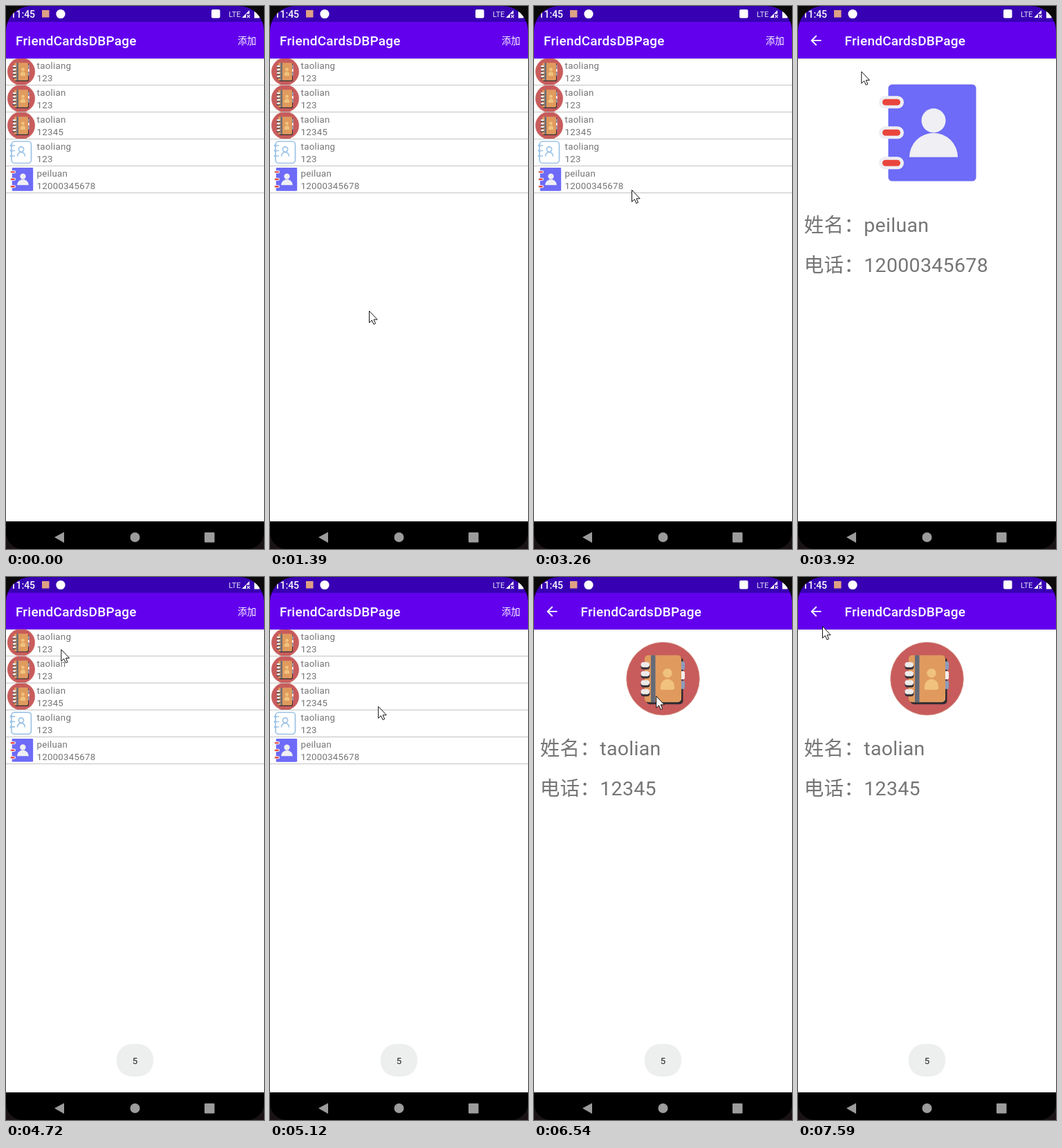
An HTML page that plays this animation: 373 px wide and 786 px high, repeating every 7.99 s.

```html
<!DOCTYPE html>
<html lang="zh">
<head>
<meta charset="utf-8">
<title>Contacts</title>
<style>
html, body { margin: 0; width: 100%; height: 100%; overflow: hidden; background: #000; }
svg { display: block; width: 100vw; height: 100vh; }
text { font-family: Roboto, "Noto Sans CJK SC", "Noto Sans CJK", sans-serif; white-space: pre; }
.title { font-size: 19px; font-weight: 500; letter-spacing: .24px; fill: #fff; }
.row { font-size: 13.3px; letter-spacing: .24px; fill: #757575; }
.big { font-size: 28.5px; letter-spacing: .32px; fill: #757575; }
</style>
</head>
<body>
<svg viewBox="0 0 373 786" preserveAspectRatio="none">
  <defs>
    <linearGradient id="shade" x1="0" y1="0" x2="0" y2="1">
      <stop offset="0" stop-color="#000" stop-opacity=".12"/>
      <stop offset="1" stop-color="#000" stop-opacity="0"/>
    </linearGradient>
    <clipPath id="rowClip"><rect x="-22" y="-19" width="44" height="38"/></clipPath>

    <!-- orange book in a red disc, centred on 0,0 -->
    <g id="book">
      <circle r="52.800" fill="#c85c5c" stroke="#d6978a" stroke-width=".8"/>
      <rect x="-24" y="-31" width="53" height="68" rx="5" fill="#2f2b33"/>
      <g id="tabs"></g>
      <rect x="-26.500" y="-34" width="53" height="68" rx="5" fill="#e09a5e"/>
      <rect x="-17.500" y="-34" width="6.500" height="68" fill="#646a78"/>
      <g id="coils"></g>
      <circle cx="6.500" cy="-8" r="6.600" fill="#f0c27d"/>
      <path d="M-3.500 16V11a10 10.500 0 0 1 20 0V13q0 3-3 3z" fill="#f0c27d"/>
    </g>

    <!-- violet notebook, 140 x 140 -->
    <g id="violet">
      <rect x="13.500" y=".3" width="127" height="140" rx="5.500" fill="#6d6bf7"/>
      <g id="rings"></g>
      <circle cx="79" cy="52.500" r="17.500" fill="#efeff4"/>
      <path d="M44 105.500a35 35 0 0 1 70 0z" fill="#efeff4"/>
    </g>

    <!-- outlined notebook -->
    <g id="outline" fill="none" stroke="#9dc3e6" stroke-width="1.700" stroke-linecap="round">
      <rect x="8" y="196" width="28.500" height="31.500" rx="4.500" fill="#fff"/>
      <g id="loops"></g>
      <circle cx="22" cy="207.500" r="3.600"/>
      <path d="M16.500 217c1-7 10-7 11 0"/>
    </g>
  </defs>

  <rect width="373" height="786"/>

  <g id="list"></g>
  <g id="detail"></g>

  <g id="toast">
    <rect x="160" y="676" width="53" height="47" rx="22" fill="#edefef"/>
    <text x="186.500" y="705" text-anchor="middle" font-size="13.300" fill="#222">5</text>
  </g>

  <g id="system" fill="#fff">
    <text x="6.500" y="17" font-size="14" font-weight="500">11:45</text>
    <rect x="52" y="6" width="10.500" height="10.500" fill="#dfa184"/>
    <circle cx="79" cy="11.500" r="6.600"/>
    <rect id="chip" x="297" y="5" width="12.500" height="12.500" rx="2"/>
    <text x="322" y="15.500" font-size="11" fill="#e4dcf6">LTE</text>
    <path d="M341 17L352 6V11.500H347V17z"/>
    <path d="M348.500 13l4 4m0-4l-4 4" stroke="#fff" stroke-width="1.100"/>
    <path d="M359 7h2V5.500h3.500V7h2v10.500h-7.500z"/>
    <g fill="#9c9c9c">
      <path d="M70 769L84 761.500V777z"/>
      <circle cx="186.500" cy="769" r="7"/>
      <rect x="287" y="762" width="14.500" height="14.500" rx="1"/>
    </g>
  </g>

  <path fill="#0c090b" d="M0 0H36A36 36 0 0 0 0 36zM373 0H337A36 36 0 0 1 373 36z"/>
  <path fill="#1a1316" d="M0 786V762A24 24 0 0 0 24 786zM373 786V762A24 24 0 0 1 349 786z"/>

  <path id="cursor" d="M.5.5V17.500L4.300 13.900 7 19.800 9.600 18.600 7 12.900H12.200z"
        fill="#fff" stroke="#111" stroke-width="1" stroke-linejoin="round"/>
</svg>

<script>
const LOOP = 7990, STEP = 200 / 3, OPEN_MS = 400;
const TITLE = 'FriendCardsDBPage';
const $ = id => document.getElementById(id);
const text = (cls, x, y, s) => `<text class="${cls}" x="${x}" y="${y}">${s}</text>`;
const repeat = (n, fn) => Array.from({ length: n }, (_, i) => fn(i)).join('');

$('tabs').innerHTML = repeat(3, i =>
  `<rect x="24" y="${-25 + i * 14}" width="7.500" height="12" rx="2" fill="${i === 1 ? '#f2eeee' : '#8d9cba'}"/>`);
$('coils').innerHTML = repeat(4, i => {
  const y = -24 + i * 13;
  return `<rect x="-32" y="${y + 2}" width="13" height="8.500" rx="4" fill="#332f36"/>
    <rect x="-32" y="${y}" width="12.500" height="7.500" rx="3.700" fill="#eeeaea"/>`;
});
$('rings').innerHTML = repeat(3, i => {
  const y = 26 + i * 44;
  return `<rect y="${y - 9}" width="36" height="18" rx="9" fill="#eeeef3"/>
    <rect x="5" y="${y - 4.5}" width="26" height="9" rx="4.500" fill="#e9453d"/>`;
});
$('loops').innerHTML = repeat(3, i => {
  const y = 202 + i * 7.5;
  return `<path d="M8 ${y}H12.500"/><circle cx="7.500" cy="${y}" r="1" fill="#fff"/>`;
});

// Window background: status bar, toolbar, page and navigation strip.
const frame = `
  <rect width="373" height="746" fill="#fff"/>
  <rect y="76" width="373" height="3" fill="url(#shade)"/>
  <rect width="373" height="23.200" fill="#3700b3"/>
  <rect y="23" width="373" height="53" fill="#6200ee"/>
  <rect y="746" width="373" height="40"/>`;

const people = [
  ['taoliang', '123'], ['taolian', '123'], ['taolian', '12345'],
  ['taoliang', '123'], ['peiluan', '12000345678']
];
const smallBook = y =>
  `<g transform="translate(22 ${y})" clip-path="url(#rowClip)"><use href="#book" transform="scale(.378)"/></g>`;

$('list').innerHTML = frame + text('title', 14, 57, TITLE) +
  `<text x="335" y="55" font-size="13.300" letter-spacing=".24" fill="#fff">添加</text>` +
  people.map(([name, phone], i) => {
    const y = 76 + i * 39;
    return (i < 3 ? smallBook(y + 19) : '') +
      text('row', 44.6, y + 15.2, name) + text('row', 44.6, y + 33.4, phone) +
      `<rect y="${y + 38}" width="373" height="1" fill="#c2c2c2"/>`;
  }).join('') +
  `<use href="#outline"/><use href="#violet" transform="translate(5.500 234) scale(.24)"/>
   <rect id="dim" y="23" width="373" height="763" opacity="0"/>`;

const card = (id, art, y, [name, phone]) => `<g id="${id}">${art}
  ${text('big', 8.8, y, '姓名：' + name)}${text('big', 8.8, y + 57.7, '电话：' + phone)}</g>`;

$('detail').innerHTML = frame + text('title', 67.5, 57, TITLE) +
  `<path transform="translate(14.600 38.500) scale(.95)" fill="#fff"
    d="M20 11H7.830l5.590-5.590L12 4l-8 8 8 8 1.410-1.410L7.830 13H20v-2z"/>` +
  card('first', '<use href="#violet" x="117" y="113.300"/>', 327, people[4]) +
  card('second', '<use href="#book" x="186.500" y="147.200"/>', 258, people[2]);

const clamp = v => Math.min(1, Math.max(0, v));
const mix = (a, b, k) => a + (b - a) * k;
const cubic = (a, b, c, d, s) => {
  const r = 1 - s;
  return a * r * r * r + 3 * b * s * r * r + 3 * c * s * s * r + d * s * s * s;
};

// Fast start with a long, slow settle: two joined Bezier segments.
function settle(x) {
  if (x <= 0) return 0;
  if (x >= 1) return 1;
  const [xs, ys] = x < 1 / 6
    ? [[0, .05, .1333, 1 / 6], [0, 0, .06, .4]]
    : [[1 / 6, .2083, .25, 1], [.4, .82, 1, 1]];
  let lo = 0, hi = 1;
  for (let i = 0; i < 24; i++) {
    const m = (lo + hi) / 2;
    if (cubic(...xs, m) < x) lo = m; else hi = m;
  }
  return cubic(...ys, lo);
}

// time, x, y of the pointer tip
const path = [
  [585, 245, 776], [920, 228, 699], [1060, 214, 640], [1390, 143, 441], [1600, 131, 345],
  [1790, 150, 300], [2130, 152, 190], [2300, 145, 158], [2590, 137, 195], [3000, 140, 258],
  [3260, 141, 266], [3460, 141, 264], [3700, 122, 180], [3920, 92, 95], [4190, 36, 52],
  [4330, 27, 47], [4520, 30, 50], [4800, 98, 125], [5120, 156, 187], [5500, 172, 179],
  [5930, 177, 172], [6700, 176, 172], [7050, 95, 125], [7330, 14, 82], [7520, 30, 74],
  [7588, 35, 71]
];
function pointer(t) {
  const i = path.findIndex(p => p[0] > t);
  if (i < 0) return path[path.length - 1];
  const a = path[i - 1] || path[0], b = path[i];
  const k = a === b ? 0 : (t - a[0]) / (b[0] - a[0]);
  return [t, mix(a[1], b[1], k), mix(a[2], b[2], k)];
}

function pose(id, scale, opacity) {
  $(id).setAttribute('transform', `translate(186.500 393) scale(${scale}) translate(-186.500 -393)`);
  $(id).setAttribute('opacity', opacity);
}
const OPEN_1 = 3330, CLOSE_1 = 4430, OPEN_2 = 5762, TOAST = 4450;

function draw(time) {
  const t = Math.floor((time + 14) / STEP) * STEP - 10;
  const closing = t >= CLOSE_1 && t < OPEN_2;
  const since = t - (closing ? CLOSE_1 : t < CLOSE_1 ? OPEN_1 : OPEN_2);
  const p = settle(since / OPEN_MS), fade = clamp((since - 35) / 50);

  pose('list', 1 + .048 * (closing ? 1 - p : p), 1);
  pose('detail', closing ? 1 - .1 * p : mix(.85, 1, p), closing ? 1 - fade : fade);
  $('dim').setAttribute('opacity', closing ? 0 : .25 * p);
  $('first').setAttribute('visibility', t < OPEN_2 ? 'visible' : 'hidden');
  $('second').setAttribute('visibility', t < OPEN_2 ? 'hidden' : 'visible');

  $('toast').setAttribute('opacity', clamp((t - TOAST) / 200));
  $('chip').setAttribute('opacity', t > 4400 && t < 6250 ? 0 : 1);

  const [, x, y] = pointer(t);
  $('cursor').setAttribute('transform', `translate(${x} ${y})`);
  $('cursor').setAttribute('visibility', t < 585 ? 'hidden' : 'visible');
}

let start;
function tick(now) {
  start ??= now;
  draw((now - start) % LOOP);
  requestAnimationFrame(tick);
}
draw(0);
requestAnimationFrame(tick);
</script>
</body>
</html>
```
